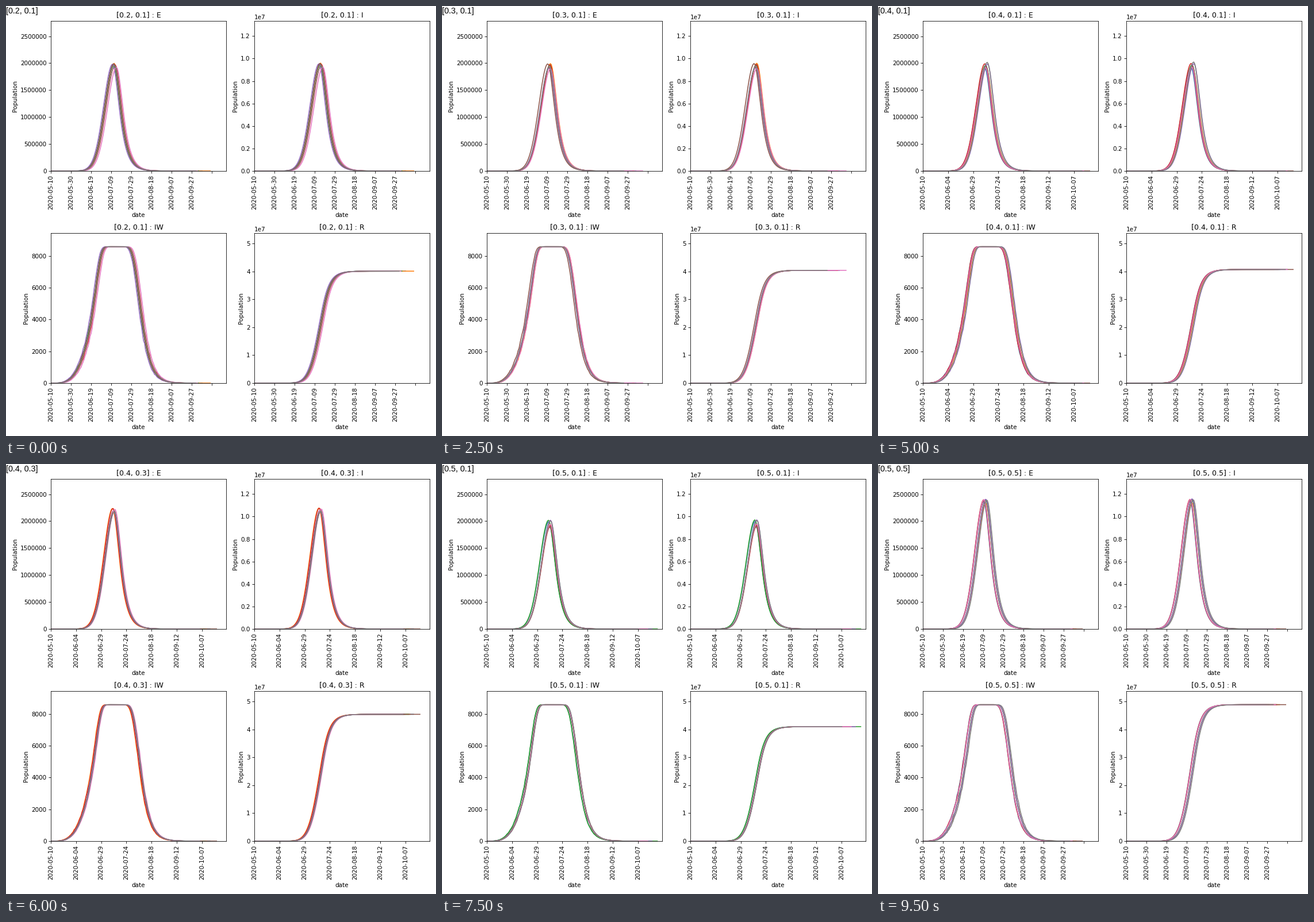
A matplotlib script for the animation above (10000 ms loop, 748 by 748 pixels).

```python
import numpy as np
import matplotlib.pyplot as plt
from matplotlib.animation import FuncAnimation

SIZE, DPI = 748, 74.8
RUNS = 8
WARDS = 8588
PEAK_DAY = 62.4
DAYS = np.arange(181)
START = np.datetime64("2020-05-10")
LONG_EPIDEMICS = {4, 6, 10, 12, 15, 16}  # steps that outlast 160 days

plt.rcParams.update({
    "font.family": "DejaVu Sans",
    "axes.formatter.limits": (-7, 7),
    "axes.formatter.useoffset": False,
})


def wave(t):
    """Unit epidemic peak: slow rise, quicker fall with a long tail."""
    rise = np.exp(-(np.abs(np.minimum(t, 0)) / 12.8) ** 1.9)
    return np.where(t < 0, rise, 1 / np.cosh(np.maximum(t, 0) / 6))


def ward_share(t, fall_day):
    """Share of wards infected: a ramp up, a plateau and a ramp down."""
    r = np.clip(t / 40.5, 0, 2)
    rise = 1 - np.exp(-np.log(2) * (0.8 * r ** 3.7 + 0.2 * r ** 12))
    fall = 1 - np.exp(-np.log(2) * np.exp(np.minimum((fall_day - t) / 6.4, 5)))
    return rise * fall


def curves(a, b, delay, peak, rng):
    """Series E, I, IW and R of one run; a and b count from the lowest pair."""
    t = DAYS - delay
    wards = ward_share(t, 89.5 + 6 * (a - b))
    wards += rng.normal(0, 0.005, len(t)) * 4 * wards * (1 - wards)
    removed = np.cumsum(wave(t - PEAK_DAY - 4.2))
    total = 4.01e7 + 3e6 * a + 2.75e7 * b - 1.95e7 * b * b
    return (peak * wave(t - PEAK_DAY), 4.81 * peak * wave(t - PEAK_DAY - 2.9),
            WARDS * wards, total * removed / removed[-1])


def make_panel(name, x, y, top):
    w, h = 305, 261
    ax = fig.add_axes([x / SIZE, 1 - (y + h) / SIZE, w / SIZE, h / SIZE])
    ax.set(xlim=(0, 174), ylim=(0, top), xlabel="date", ylabel="Population")
    lines = [ax.plot([], [], color=f"C{k}", lw=1.5)[0] for k in range(RUNS)]
    return name, ax, lines


fig = plt.figure(figsize=(SIZE / DPI, SIZE / DPI), dpi=DPI, facecolor="white")
panels = [make_panel("E", 78, 26, 2.783e6), make_panel("I", 431.9, 26, 1.3345e7),
          make_panel("IW", 78, 395, 9446), make_panel("R", 431.9, 395, 5.374e7)]
caption = fig.text(0, 1 - 13.3 / SIZE, "", family="Liberation Sans",
                   size=14.4 * 72 / DPI, va="baseline")


def draw(step):
    rng = np.random.RandomState(40 + step)
    a, b = step // 5 / 10, step % 5 / 10
    pair = f"[{0.2 + a:.1f}, {0.1 + b:.1f}]"
    caption.set_text(pair)

    is_long = step in LONG_EPIDEMICS
    ticks = np.arange(0, 151, 25) if is_long else np.arange(0, 161, 20)
    labels = [str(START + int(d)) if d <= 150 else "" for d in ticks]
    for name, ax, _ in panels:
        ax.set_title(f"{pair} : {name}")
        ax.set_xticks(ticks, labels, rotation=90)

    delays = rng.normal(0.5 - 2.5 * b, 0.95, RUNS)
    peaks = rng.normal(1.96e6 + 1.13e6 * b, 3.5e4, RUNS)
    last_day = rng.uniform(161, 170) if is_long else rng.uniform(149, 160)
    ends = last_day - rng.uniform(5, 20, RUNS)
    ends[rng.randint(RUNS - 1)] = last_day

    for k, end in enumerate(ends):
        days = np.append(DAYS[DAYS < end], end)
        series = curves(a, b, delays[k], peaks[k], rng)
        for (_, _, lines), values in zip(panels, series):
            lines[k].set_data(days, np.interp(days, DAYS, values))


anim = FuncAnimation(fig, draw, frames=20, interval=500, init_func=lambda: None,
                     repeat=True, repeat_delay=0)
plt.show()
```
